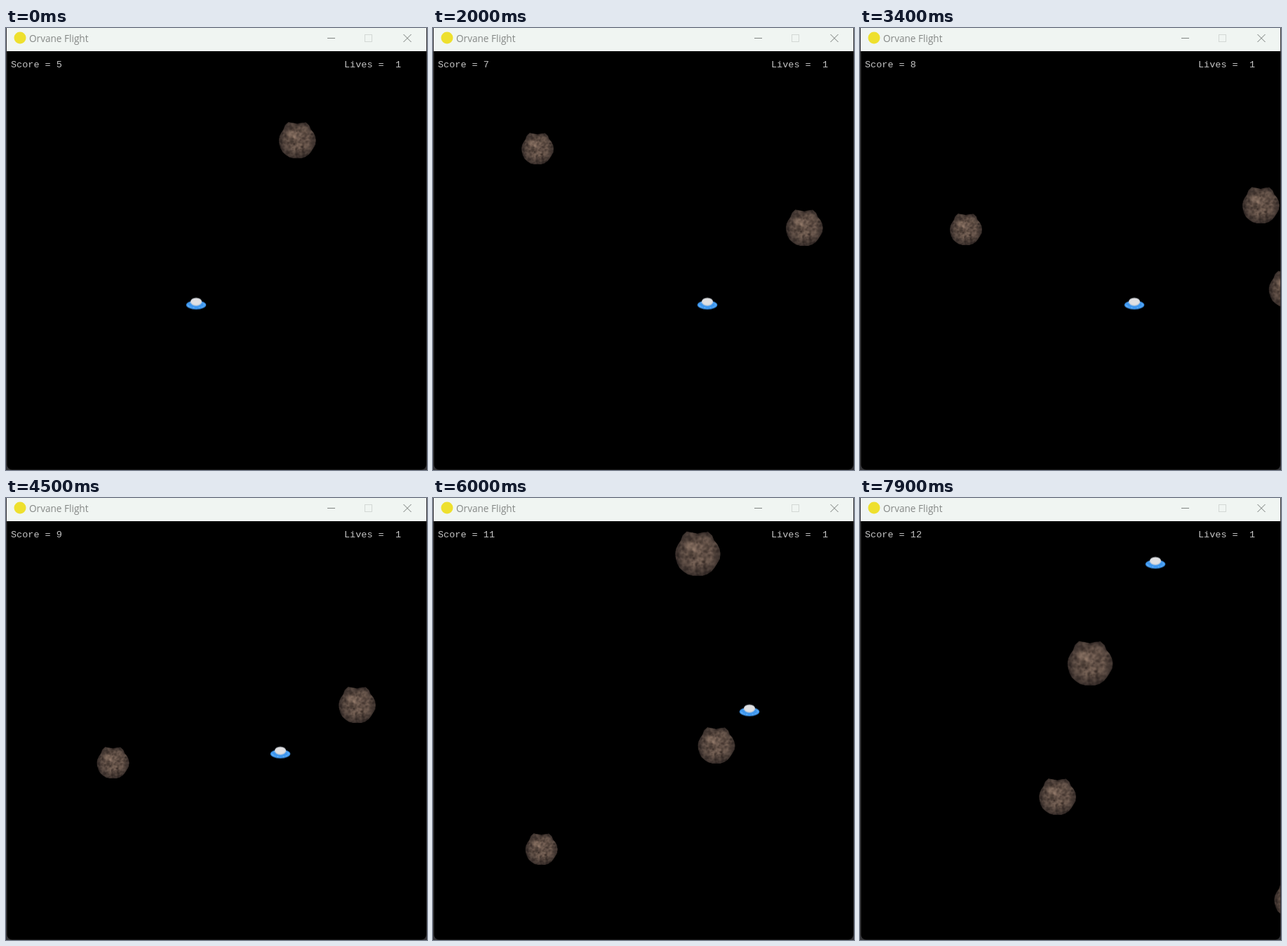
Recreate the animation shown at these times as an HTML page with a canvas. Size 600 by 629 pixels, loop 8000 ms.

```html
<!DOCTYPE html>
<html lang="en">
<head>
<meta charset="utf-8">
<title>Orvane Flight</title>
<style>
  html, body { margin: 0; width: 100%; height: 100%; overflow: hidden; background: #000; }
  canvas { display: block; }
</style>
</head>
<body>
<canvas id="stage" width="600" height="629"></canvas>
<script>
const ctx = document.getElementById('stage').getContext('2d');
const LOOP = 8000, STEP = 100, TAU = Math.PI * 2;

// start position, speed in px per second, radius
const rocks = [
  { x: 415, y: 160, vx: 57, vy: 62.3, r: 27 },
  { x: 146, y: 8, vx: 1.4, vy: 82, r: 23.5 },
  { x: 790, y: 122, vx: -64.4, vy: 38.4, r: 27 },
  { x: 533, y: -413, vx: -26, vy: 82.1, r: 33 },
  { x: 1122, y: 335, vx: -64, vy: 30, r: 27 }
];

// one arrow key per beat: left, right, up, down or none
const KEYS = '..D.URRRR....D.U.....U...RUR.U.UUUUUUUL.';
const BEAT = 200, GRID = 30;
const presses = (key, t) => KEYS.slice(0, Math.floor(t / BEAT) + 1).split(key).length - 1;

function seeded(seed) {
  return () => (seed = (seed * 16807) % 2147483647) / 2147483647;
}

function sprite(w, h, paint) {
  const c = document.createElement('canvas');
  c.width = w;
  c.height = h;
  paint(c.getContext('2d'));
  return c;
}

const rockImage = sprite(132, 132, g => {
  const rnd = seeded(71);
  g.translate(66, 66);
  g.scale(65, 65);

  // rough disc with a notch between two bumps on top
  g.beginPath();
  for (let u = -Math.PI; u < Math.PI; u += TAU / 28) {
    const r = .98 - .11 * Math.cos(6 * u) * Math.exp(-u * u) + (rnd() - .5) * .05;
    g.lineTo(r * Math.sin(u), -r * Math.cos(u));
  }
  g.clip();
  g.fillStyle = '#66544a';
  g.fillRect(-1, -1, 2, 2);

  const blob = (x, y, r, rgb, alpha) => {
    const fade = g.createRadialGradient(x, y, 0, x, y, r);
    fade.addColorStop(0, `rgba(${rgb},${alpha})`);
    fade.addColorStop(1, `rgba(${rgb},0)`);
    g.fillStyle = fade;
    g.fillRect(x - r, y - r, 2 * r, 2 * r);
  };
  for (let i = 0; i < 700; i++) {
    const rgb = i % 2 ? '34,25,22' : '156,130,113';
    blob(rnd() * 2 - 1, rnd() * 2 - 1, .05 + rnd() * .1, rgb, .32);
  }
  blob(-.28, -.32, .3, '160,134,116', .5);
  blob(-.28, .04, .24, '22,17,15', .5);

  const shade = g.createRadialGradient(.05, -.1, .5, 0, 0, 1.12);
  shade.addColorStop(0, 'rgba(24,20,21,0)');
  shade.addColorStop(1, 'rgba(24,20,21,.7)');
  g.fillStyle = shade;
  g.fillRect(-1, -1, 2, 2);
});

const shipImage = sprite(30, 20, g => {
  const rnd = seeded(9);
  const ellipse = (y, rx, ry, color) => {
    g.fillStyle = color;
    g.beginPath();
    g.ellipse(15, y, rx, ry, 0, 0, TAU);
    g.fill();
  };
  ellipse(11.6, 14.2, 6.3, '#3d96ee');
  g.fillStyle = 'rgba(125,192,252,.7)';
  for (let i = 0; i < 40; i++) {
    const a = rnd() * TAU;
    g.fillRect(14.5 + 11.5 * Math.cos(a), 11 + 4.5 * Math.sin(a), 1, 1);
  }
  ellipse(7.2, 8.2, 5.8, '#c6ced9');
  ellipse(6.8, 7, 4.8, '#e0e0e2');
});

function write(text, x, y, font, color) {
  ctx.font = font;
  ctx.fillStyle = color;
  ctx.fillText(text, x, y);
}

function line(color, ...points) {
  ctx.strokeStyle = color;
  ctx.beginPath();
  points.forEach(([x, y], i) => i % 2 ? ctx.lineTo(x, y) : ctx.moveTo(x, y));
  ctx.stroke();
}

function titleBar() {
  ctx.fillStyle = '#f0f5f2';
  ctx.fillRect(1, 0, 598, 33);
  ctx.fillStyle = '#eee02e';
  ctx.beginPath();
  ctx.arc(20, 14, 8.5, 0, TAU);
  ctx.fill();
  write('Orvane Flight', 33, 19.5, '13.6px "Open Sans", sans-serif', '#858886');
  ctx.lineWidth = 1;
  line('#808482', [458, 14.5], [469, 14.5]);
  line('#777b79', [566.5, 9], [577.5, 20], [577.5, 9], [566.5, 20]);
  ctx.strokeStyle = '#d3d8d5';
  ctx.strokeRect(511.5, 9.5, 10, 10);
}

function draw(t) {
  const sec = t / 1000;
  ctx.fillStyle = '#343437';
  ctx.fillRect(0, 0, 600, 629);
  ctx.save();
  ctx.beginPath();
  ctx.roundRect(1.5, -10, 597.5, 638.5, 7);
  ctx.clip();
  ctx.fillStyle = '#000';
  ctx.fillRect(0, 0, 600, 629);

  for (const { x, y, vx, vy, r } of rocks) {
    ctx.drawImage(rockImage, x + vx * sec - r, y + vy * sec - r, 2 * r, 2 * r);
  }

  const shipX = 271 + GRID * (presses('R', t) - presses('L', t));
  const shipY = 392 + GRID * (presses('D', t) - presses('U', t));
  ctx.drawImage(shipImage, shipX - 15, shipY - 9.5);

  const mono = '13.5px "Liberation Mono", monospace';
  write('Score = ' + (5 + Math.floor(sec)), 7, 55.5, mono, '#c4c4c4');
  write('Lives =  1', 482, 55.5, mono, '#c4c4c4');
  ctx.restore();
  titleBar();
}

ctx.imageSmoothingQuality = 'high';
function tick(now) {
  draw(Math.floor(now % LOOP / STEP) * STEP);
  requestAnimationFrame(tick);
}
requestAnimationFrame(tick);
</script>
</body>
</html>
```
